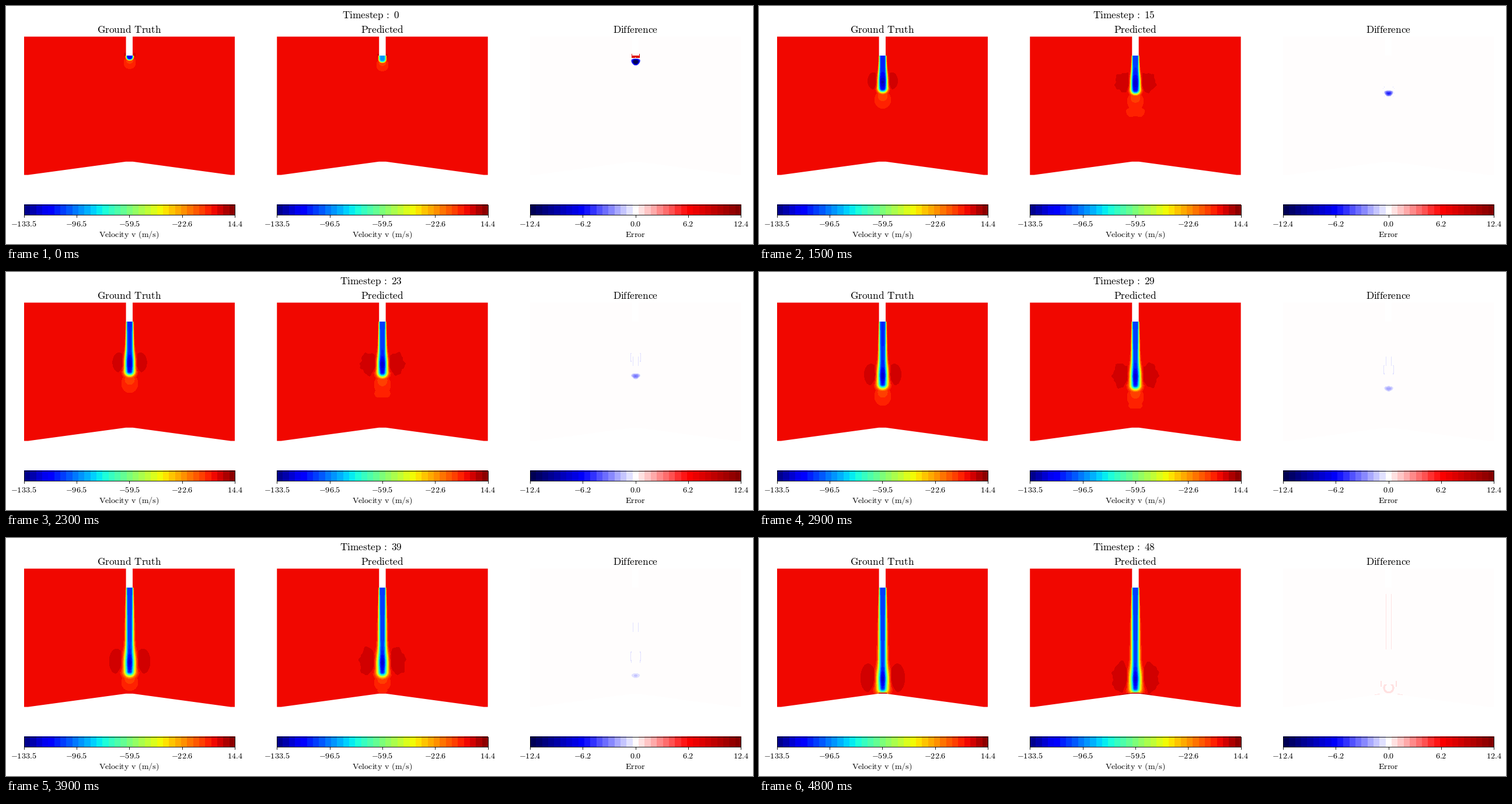
These frames come from a looping animation (1280x408 px, 4900 ms). A matplotlib script:

```python
import numpy as np
import matplotlib.pyplot as plt
from matplotlib.animation import FuncAnimation
from matplotlib.colors import ListedColormap
from matplotlib.patches import Polygon, Rectangle

W, H, DPI = 1280, 408, 64
PT = 72 / DPI                # points in one pixel
STEPS, BANDS = 49, 35
VMIN, VMAX, EMAX = -133.5, 14.4, 12.4
BAND = (VMAX - VMIN) / BANDS
LOW = VMIN + 31 * BAND       # bounds of the band that holds still gas
HIGH = LOW + BAND
PANEL, PITCH, LEFT = 361.4, 433.65, 30.6
TOP, BOTTOM = 52, 291
LATE = 43                    # step at which the jet meets the wall

plt.rcParams["mathtext.fontset"] = "cm"

# Pixel grid: r is the offset from the jet axis, y the height on the stage
r, y = np.meshgrid(np.arange(361) - 180.0, np.arange(TOP, BOTTOM) + 0.5)
ar = np.abs(r)
wall = 267 + 23 * np.clip((ar - 6) / 168, 0, 1)


def ellipse(x, cx, cy, w, h):
    return np.hypot((x - cx) / w, (y - cy) / h)


def tip_at(n, predicted=False):
    lead = 4 * (1 - n / 50) if predicted else 0
    return min(94 + 3.67 * n + lead, 266)


def jet_flow(n, tip, lobe_y, speed):
    swell = min(1, 0.2 + n / 10)
    travel = np.exp(-np.maximum(0, y - 85) / 45)
    head = np.exp(-(np.minimum(0, y - lobe_y) / 20) ** 2)
    radius = 5.2 + 0.3 * (1 - travel) + 1.3 * swell * head
    power = 2.4 + 3.6 * travel - 0.6 * head
    d = np.hypot(r, np.maximum(0, y - tip + 1.2 * (5.5 + 1.3 * swell)))
    core = np.exp(-np.log(2) * (d / radius) ** power) * (y > 85)
    fast = 16 * np.exp(-((y - lobe_y - 2) / 13) ** 2) * min(1, n / 12)
    return core, -(speed + fast) * core


def pushed_gas(n, tip):
    # Nested rounds that all touch at the tip, cut short by the wall
    height = max(1, min(22 + 0.6 * n, 33, 266 - tip))
    width = min(28, 20 + 0.5 * n)
    rise = y - tip + (4 if n else 8)
    size = (r * height / width) ** 2 + rise ** 2
    size = size / np.maximum(rise, 0.1) / height
    return np.where((rise > 0) & (size < 1), LOW - 10 * (1 - size), 0)


def puff(n, tip):
    grow = min(1, n / 6) + 0.01
    cy = tip + 34 - 0.3 * n
    e = ellipse(r, 0, cy, (21 - 0.35 * n) * grow, (10 - 0.08 * n) * grow)
    e += 0.12 * np.cos(r / 3) * (y > cy)
    return np.where(e < 1, LOW - 1, 0)


def side_lobes(n, lobe_y, outer, height, rough):
    inner = 5 + n * n / 350
    mid, half = (outer + inner) / 2, (outer - inner) / 2
    e = ellipse(ar, mid, lobe_y, half, height)
    angle = np.arctan2(y - lobe_y, ar - mid)
    wave = np.sin(5 * angle + 0.15 * n + 0.8 * (r > 0))
    e *= 1 + rough * (wave + 0.5 * np.sin(11 * angle - 0.3 * n))
    spot = ellipse(ar, 9 + n / 7, lobe_y + 2, 3 + n / 40, 5 + n / 8)
    lobe = HIGH * np.exp(0.5 * (1 - e ** 2))
    lobe += min(6, 0.25 * n) * np.exp(-0.8 * spot ** 2)
    return np.where((e < 1) | (spot < 1.3), lobe, 0)


def velocity(n, predicted):
    tip = tip_at(n, predicted)
    lobe_y = tip - 10 - 17 * (1 - np.exp(-n / 15))
    height = (10 + 0.3 * n) * min(1, 0.4 + n / 8)
    if predicted:
        speed = 108 - 16 * np.exp(-n / 2)
        outer = 9 + 30 * (1 - np.exp(-n / 8))
    else:
        speed = 108 + 10 * np.exp(-n / 8)
        outer = 10 + 4 * np.sqrt(n)

    core, v = jet_flow(n, tip, lobe_y, speed)
    v = np.minimum(v, pushed_gas(n, tip))
    if predicted:
        v = np.minimum(v, puff(n, tip))
        height += 2
    rough = 0.09 if predicted else 0
    v += side_lobes(n, lobe_y, outer, height, rough) * (1 - core)
    if n > LATE:
        v[(y > wall - 1.6) & (ar < (28 if predicted else 7))] = HIGH + 2
    return v


def error(n):
    cy = tip_at(n, True) - 2
    taper = r * (1 + 0.06 * np.clip(y - cy, -5, 5))
    blob = ellipse(taper, 0, cy, 7.5, 6.5 - 0.05 * n)
    e = -14 * np.exp(-n / 16) * np.maximum(0, 1 - blob ** 2) * (n < LATE)
    side = ellipse(ar, 5, cy - 12, 4, 7.5)
    e += 4 * np.exp(-((n - 7) / 4) ** 2) * np.maximum(0, 1 - side ** 2)

    # Cup under the nozzle, gone after a few steps
    cup = (ar < 6.6) & (y > 85) & (y < 88.5 + ar / 6)
    rim = (ar > 5) & (ar < 6.6) & (y > 82) & (y < 86)
    e[cup | rim] += max(0, 7.5 - 2.5 * n)

    # Faint lines along the jet and around its head
    top, low = (96, 191) if n > LATE else (145, 161)
    marks = (np.abs(ar - 4) < 0.6) & (y > top) & (y < low) & (n > 18)
    if n > LATE:
        marks |= (np.abs(np.hypot(r, y - 257) - 7.5) < 1.6) & (y > 251)
        marks |= (np.abs(ar - 12.5) < 0.8) & (y > 245) & (y < 255)
        marks |= (y > wall - 1.2) & (ar > 14) & (ar < 24) & (y < wall + 1)
    elif n > 18:
        bow = 7 + 1.3 * np.cos((y - cy + 33) / 6)
        marks |= (np.abs(ar - bow) < 0.7) & (np.abs(y - cy + 32) < 4 + n / 7)
    elif n > 4:
        grain = np.sin(1.2 * ar + 0.4 * n) * np.sin(0.8 * y + 0.5 * ar)
        near = (ar > 4) & (ar < 12) & (np.abs(y - cy + 5) < 10)
        marks |= (grain > 0.75) & near
    e[marks & (np.abs(e) < 0.4)] = 0.5 if n > LATE else -0.5
    return e


def banded(name):
    centres = (np.arange(BANDS) + 0.5) / BANDS
    return ListedColormap(plt.get_cmap(name)(centres))


fig = plt.figure(figsize=(W / DPI, H / DPI), dpi=DPI, facecolor="white")
ax = fig.add_axes([0, 0, 1, 1])


def roman(s):
    s = s.replace(" : ", r"\hspace{0.18}:\hspace{0.3}")
    return r"$\mathrm{" + s.replace(" ", r"\hspace{0.38}") + "}$"


def write(x, base, s, px):
    return ax.text(x, base, roman(s), size=px * PT, color="black",
                   ha="center", va="baseline")


def chamber(left):
    """Outline of the gas volume: nozzle slot on top, ridge below."""
    mid, right = left + PANEL / 2, left + PANEL
    points = [(left, 52.5), (mid - 5.7, 52.5), (mid - 5.7, 85),
              (mid + 5.7, 85), (mid + 5.7, 52.5), (right, 52.5),
              (right, 289.6), (right - 7, 289.6), (mid + 6, 266.8),
              (mid - 6, 266.8), (left + 7, 289.6), (left, 289.6)]
    return Polygon(points, transform=ax.transData)


def panel(i, title, label, name, lo, hi):
    left = LEFT + PITCH * i
    right, mid = left + PANEL, left + PANEL / 2
    cmap = banded(name)
    style = dict(cmap=cmap, interpolation="nearest", aspect="auto")
    image = ax.imshow(np.zeros(r.shape), vmin=lo, vmax=hi,
                      extent=(left, right, BOTTOM, TOP), **style)
    image.set_clip_path(chamber(left))
    ax.imshow(np.arange(BANDS)[None], extent=(left, right, 358, 340.5),
              **style)
    ax.add_patch(Rectangle((left, 340.5), PANEL, 17.5, fill=False,
                           ec="black", lw=0.9 * PT))
    write(mid, 46, title, 17.3)
    write(mid, 396, label, 14.1)
    for q in np.linspace(0, 1, 5):
        x = left + PANEL * q
        ax.plot([x, x], [358, 361.5], color="black", lw=0.9 * PT)
        write(x, 378, f"{lo + (hi - lo) * q + 1e-9:.1f}", 14.1)
    return image


truth = panel(0, "Ground Truth", "Velocity v (m/s)", "jet", VMIN, VMAX)
guess = panel(1, "Predicted", "Velocity v (m/s)", "jet", VMIN, VMAX)
diff = panel(2, "Difference", "Error", "seismic", -EMAX, EMAX)
clock = write(625, 21.3, "Timestep : 0", 17.3)

ax.set_xlim(0, W)
ax.set_ylim(H, 0)
ax.axis("off")


def draw(n):
    truth.set_data(velocity(n, False))
    guess.set_data(velocity(n, True))
    diff.set_data(error(n))
    clock.set_text(roman(f"Timestep : {n}"))
    return truth, guess, diff, clock


anim = FuncAnimation(fig, draw, frames=STEPS, interval=100, repeat=True,
                     repeat_delay=0)
plt.show()
```
